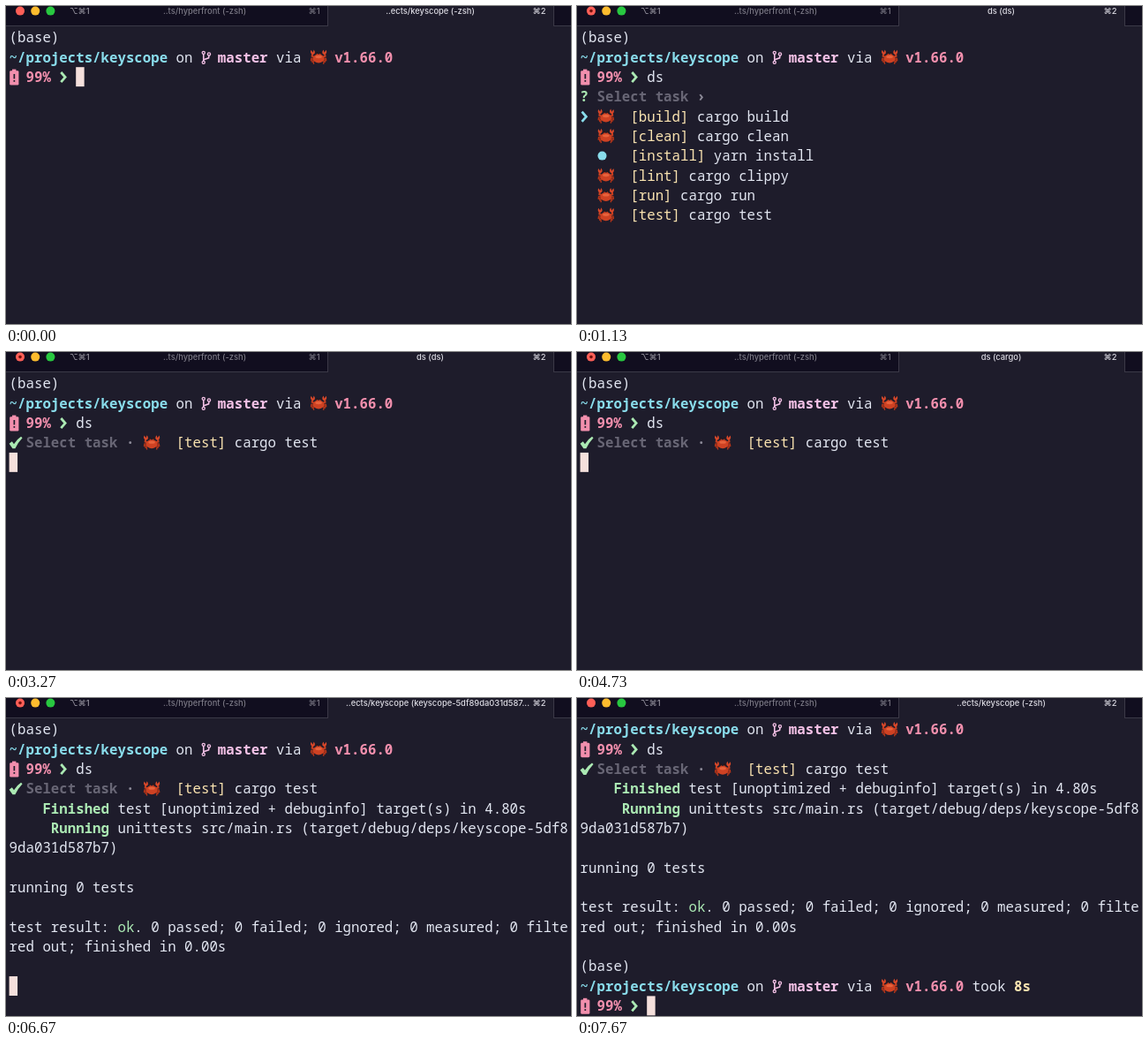
An HTML page with a canvas that plays this animation: 640x360 px, repeating every 8000 ms.

```html
<!DOCTYPE html>
<html lang="en">
<head>
<meta charset="utf-8">
<title>Terminal task runner</title>
<style>
html, body { margin: 0; width: 100%; height: 100%; overflow: hidden; background: #1e1c2b; }
canvas { display: block; width: 640px; height: 360px; }
</style>
</head>
<body>
<canvas id="stage" width="640" height="360"></canvas>
<script>
const ctx = document.getElementById('stage').getContext('2d');
const LOOP = 8000, CELL = 9.45, LEFT = 3.6, PITCH = 22.35, TOP = 24.5;
const BG = '#1e1c2b', TEXT = '#e2e6f1', CYAN = '#89dceb', PINK = '#f5c2e7', RED = '#f28fad',
  GREEN = '#abe9b3', YELLOW = '#fae3b0', GREY = '#686675', CURSOR = '#f5e0dc';
const TASKS = [['build', 'cargo build'], ['clean', 'cargo clean'], ['install', 'yarn install'],
  ['lint', 'cargo clippy'], ['run', 'cargo run'], ['test', 'cargo test']];

// Event times in ms
const TYPE = [400, 600], MENU = 870, DOT = 930, MOVES = [1470, 1870, 2130, 2200, 2330],
  CHOSEN = 3270, CARGO = 3670, OUTPUT = 6600, DONE = 6730, IDLE = 7070;

const colX = col => LEFT + col * CELL;
const rowY = row => TOP + row * PITCH;
const passed = (times, t) => times.filter(time => t >= time).length;

function put(row, col, text, color = TEXT, bold = false) {
  ctx.font = `${bold ? 700 : 500} 15.75px "Noto Sans Mono", "DejaVu Sans Mono", monospace`;
  ctx.fillStyle = color;
  ctx.fillText(text, colX(col), rowY(row) + 16.7);
}

function disc(x, y, r, color) {
  ctx.fillStyle = color;
  ctx.beginPath();
  ctx.arc(x, y, r, 0, 7);
  ctx.fill();
}

function oval(x, y, rx, ry, color) {
  ctx.fillStyle = color;
  ctx.beginPath();
  ctx.ellipse(x, y, rx, ry, 0, 0, 7);
  ctx.fill();
}

function line(points, color, width) {
  ctx.strokeStyle = color;
  ctx.lineWidth = width;
  ctx.beginPath();
  points.forEach(([x, y]) => ctx.lineTo(x, y));
  ctx.stroke();
}

function at(x, y, draw) {
  ctx.save();
  ctx.translate(x, y);
  draw();
  ctx.restore();
}

function cursor(row, col) {
  ctx.fillStyle = CURSOR;
  ctx.fillRect(colX(col), rowY(row), CELL, PITCH - 0.4);
}

function chevron(row, col, color) {
  at(colX(col), rowY(row) + 11.4, () =>
    line([[2, -5.6], [6.8, 0], [2, 5.6]], color, 2.8));
}

function crab(row, col) {
  at(colX(col) + 10.3, rowY(row) + 11, () => {
    for (const side of [-1, 1]) {
      ctx.save();
      ctx.scale(side, 1);
      for (const i of [0, 1, 2])
        line([[4, 1 + i], [8.2 - i, 1.5 + i * 1.7], [8.6 - i * 1.6, 4.5 + i * 1.7]], '#b5351a', 1.4);
      line([[4, 0], [7.4, -1], [7, -4]], '#c83f20', 2);
      ctx.fillStyle = '#d9482a';
      ctx.beginPath();
      ctx.moveTo(5.4, -8.4);
      ctx.quadraticCurveTo(2.6, -4.4, 6.2, -2.8);
      ctx.quadraticCurveTo(10.6, -4, 8.4, -8);
      ctx.lineTo(6.6, -5.2);
      ctx.fill();
      line([[1.5, -2], [1.8, -4.6]], '#c83f20', 1.2);
      disc(1.9, -4.8, 1.1, '#2b1516');
      ctx.restore();
    }
    oval(0, 1.6, 6.2, 5, '#cf4223');
    oval(0, -0.4, 3.8, 1.7, '#e8623c');
  });
}

function branch(row, col) {
  at(colX(col), rowY(row) + 11.4, () => {
    line([[2.8, -4], [2.8, 4.5]], PINK, 1.6);
    line([[9, -2], [8.6, 0.6], [3, 2.6]], PINK, 1.6);
    for (const [x, y] of [[2.8, -5.4], [9, -3.8], [2.8, 5.6]]) {
      disc(x, y, 2.2, PINK);
      disc(x, y, 0.9, BG);
    }
  });
}

function battery(row) {
  at(LEFT, rowY(row) + 11.4, () => {
    ctx.fillStyle = RED;
    ctx.fillRect(3.4, -9, 4.4, 3);
    ctx.beginPath();
    ctx.roundRect(0.6, -7.4, 10.2, 16.4, 1.4);
    ctx.fill();
    ctx.fillStyle = BG;
    ctx.fillRect(4.9, -3.6, 1.7, 5.4);
    ctx.fillRect(4.9, 3.4, 1.7, 1.8);
  });
}

function prompt(row, input, took) {
  put(row, 0, '(base)');
  put(row + 1, 0, '~/projects/keyscope', CYAN, true);
  put(row + 1, 20, 'on');
  branch(row + 1, 23);
  put(row + 1, 25, 'master', PINK, true);
  put(row + 1, 32, 'via');
  crab(row + 1, 36);
  put(row + 1, 39, 'v1.66.0', RED, true);
  if (took) {
    put(row + 1, 47, 'took');
    put(row + 1, 52, took, YELLOW, true);
  }
  battery(row + 2);
  put(row + 2, 2, '99%', RED, true);
  chevron(row + 2, 6, GREEN);
  put(row + 2, 8, input);
}

function task(row, col, [name, command]) {
  if (name === 'install') disc(colX(col) + 6, rowY(row) + 11, 5, CYAN);
  else crab(row, col);
  put(row, col + 4, `[${name}]`, YELLOW);
  put(row, col + name.length + 7, command);
}

function menu(selected) {
  put(3, 0, '?', GREEN, true);
  put(3, 2, 'Select task', GREY, true);
  put(3, 14, '›', '#8d8b99', true);
  TASKS.forEach((item, i) => task(4 + i, 2, item));
  chevron(4 + selected, 0, CYAN);
}

function choice() {
  at(LEFT, rowY(3) + 11.4, () => {
    ctx.fillStyle = GREEN;
    ctx.beginPath();
    ctx.moveTo(0, 0.8);
    ctx.lineTo(3.2, -1.6);
    ctx.lineTo(5.4, 1.2);
    ctx.quadraticCurveTo(8.5, -4, 13.4, -7.2);
    ctx.lineTo(15, -5.6);
    ctx.quadraticCurveTo(10, -0.5, 6.8, 6.4);
    ctx.lineTo(3.8, 6.4);
    ctx.fill();
  });
  put(3, 2, 'Select task', GREY, true);
  put(3, 14, '·', '#8d8b99', true);
  task(3, 16, TASKS[5]);
}

function output() {
  put(4, 4, 'Finished', GREEN, true);
  put(4, 13, 'test [unoptimized + debuginfo] target(s) in 4.80s');
  put(5, 5, 'Running', GREEN, true);
  put(5, 13, 'unittests src/main.rs (target/debug/deps/keyscope-5df8');
  put(6, 0, '9da031d587b7)');
  put(8, 0, 'running 0 tests');
  put(10, 0, 'test result:');
  put(10, 13, 'ok', GREEN);
  put(10, 15, '. 0 passed; 0 failed; 0 ignored; 0 measured; 0 filte');
  put(11, 0, 'red out; finished in 0.00s');
}

function label(text, x, color, align = 'center') {
  ctx.font = '500 9.35px Inter, "DejaVu Sans", sans-serif';
  ctx.textAlign = align;
  ctx.fillStyle = color;
  ctx.fillText(text, x, 9.2);
  ctx.textAlign = 'left';
}

function tabs(t) {
  ctx.fillStyle = '#110e1f';
  ctx.fillRect(0, 0, 640, 22);
  ctx.fillStyle = BG;
  ctx.fillRect(364, 0, 257, 23);
  ctx.fillStyle = '#3b3947';
  ctx.fillRect(0, 22, 365, 1);
  ctx.fillRect(620, 22, 20, 1);
  ctx.fillRect(364, 0, 1, 23);
  ctx.fillRect(620, 0, 1, 23);
  ['#ff5f57', '#febc2e', '#28c840'].forEach((c, i) => disc(16 + i * 17.2, 5.6, 5, c));
  if (t >= DOT && t < IDLE) disc(16, 5.6, 1.8, '#74120e');
  label('⌥⌘1', 72, '#93919c', 'left');
  label('..ts/hyperfront (-zsh)', 225, '#7b7985');
  label('⌘1', 349, '#7b7985');
  label('⌘2', 604, '#dcdbe3');
  const title = t < MENU || t >= IDLE ? '..ects/keyscope (-zsh)'
    : t < CARGO ? 'ds (ds)'
    : t < OUTPUT ? 'ds (cargo)'
    : '..ects/keyscope (keyscope-5df89da031d587...';
  label(title, title.length > 30 ? 489 : 480.5, '#dcdbe3');
}

function draw(t) {
  ctx.fillStyle = BG;
  ctx.fillRect(0, 0, 640, 360);
  at(0, t >= DONE ? -PITCH : 0, () => {
    const typed = passed(TYPE, t);
    prompt(0, 'ds'.slice(0, typed));
    if (t < MENU) cursor(2, 8 + typed);
    else if (t < CHOSEN) menu(passed(MOVES, t));
    else {
      choice();
      if (t >= OUTPUT) output();
      if (t >= DONE) {
        prompt(13, '', '8s');
        cursor(15, 8);
      } else cursor(t < OUTPUT ? 4 : 13, 0);
    }
  });
  tabs(t);
}

const start = performance.now();
function frame() {
  draw((performance.now() - start) % LOOP);
  requestAnimationFrame(frame);
}
frame();
</script>
</body>
</html>
```
